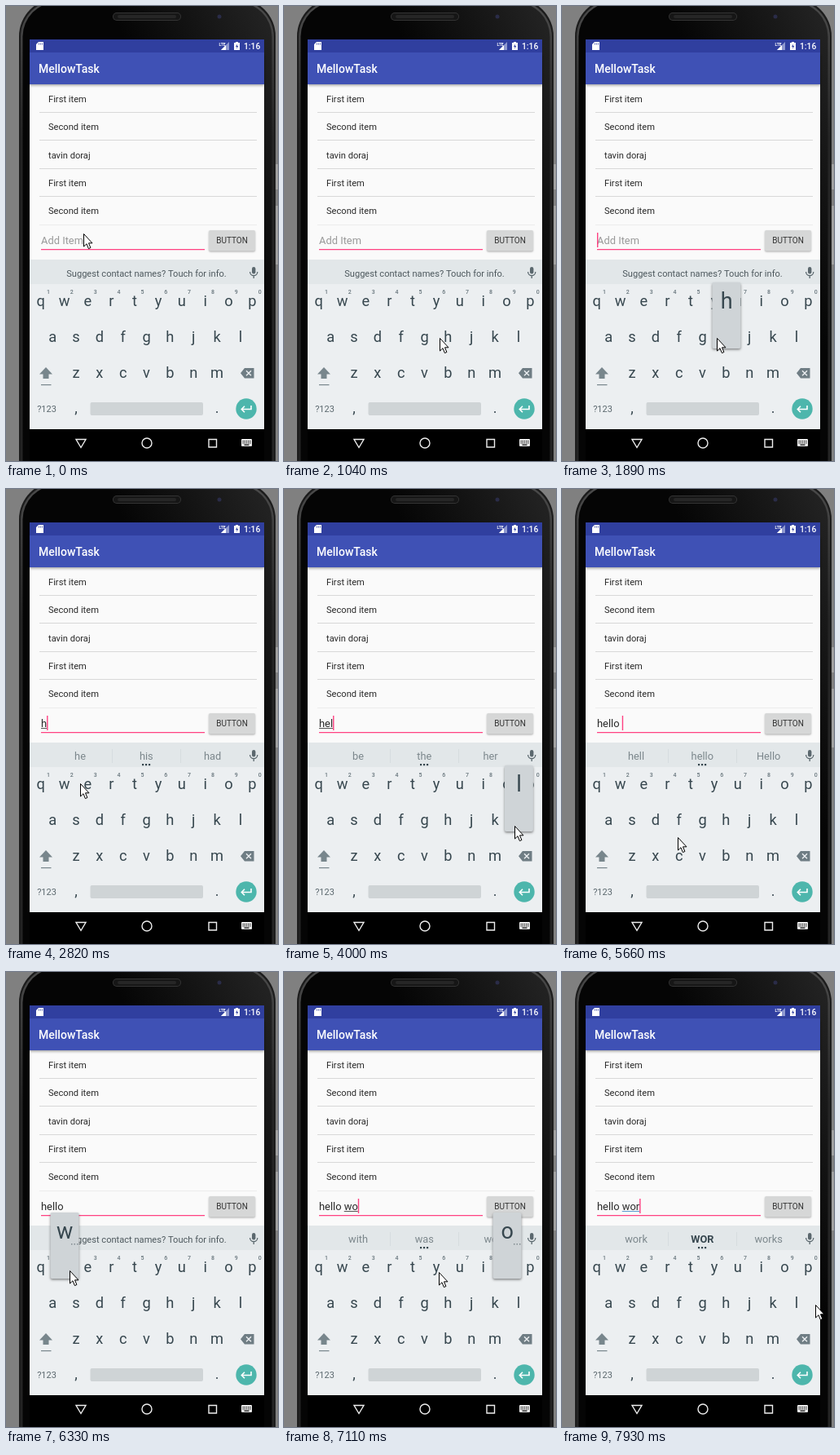
An HTML page with a canvas that plays this animation: 334x558 px, repeating every 8 s.

```html
<!DOCTYPE html>
<html lang="en">
<head>
<meta charset="utf-8">
<title>Todo typing demo</title>
<style>
html, body { margin: 0; width: 100%; height: 100%; overflow: hidden; background: #808080; }
canvas { display: block; }
</style>
</head>
<body>
<canvas id="stage" width="334" height="558"></canvas>
<script>
const LOOP = 8000, TRAVEL = 350, TYPE_DELAY = 40, RELEASE = 240, BLINK = 440;
const INK = '#37474f', PINK = '#ff4081';
const ctx = document.getElementById('stage').getContext('2d');

// Everything that moves follows from these taps: pointer, popups, text, caret, suggestions.
const tap = (at, key, x, y, words = '') => ({ at, key, x, y, words: words.split(' ').filter(Boolean) });
const taps = [
  tap(540, '', 95, 279),
  tap(1890, 'h', 191, 407, 'he his had'),
  tap(3100, 'e', 91, 361, 'be the her'),
  tap(3950, 'l', 283, 413, "help he'll held"),
  tap(4240, 'l', 283, 413, "bell he'll Bell"),
  tap(5060, 'o', 272, 365, 'hell hello Hello'),
  tap(5560, ' ', 205, 487),
  tap(6330, 'w', 77, 366, 'with was we'),
  tap(6990, 'o', 272, 369, 'would WO work'),
  tap(7560, 'r', 129, 367, 'work WOR works'),
  tap(LOOP, '', 311, 408)
];
const lastTap = t => taps.findLast(p => p.at <= t);
const isFix = words => words.length > 1 && words[1] === words[1].toUpperCase();

function stateAt(t) {
  const next = taps.findIndex(p => p.at > t);
  const from = taps[Math.max(next - 1, 0)], to = taps[next];
  const left = 1 - Math.min(Math.max((t - from.at) / TRAVEL, 0), 1);
  const ease = 1 - left * left;
  const entered = lastTap(t - TYPE_DELAY);
  return {
    x: from.x + (to.x - from.x) * ease,
    y: from.y + (to.y - from.y) * ease,
    popup: t < from.at + RELEASE ? from.key.trim() : '',
    value: taps.filter(p => p.at <= t - TYPE_DELAY).map(p => p.key).join(''),
    caret: entered && Math.floor((t - TYPE_DELAY - entered.at) / BLINK) % 2 === 0,
    words: lastTap(t - RELEASE)?.words ?? []
  };
}

const keys = {};
['qwertyuiop', 'asdfghjkl', 'zxcvbnm'].forEach((row, r) =>
  [...row].forEach((c, i) => keys[c] = { x: 42.7 + (i + r * (r + 1) / 4) * 28.85, y: 368 + r * 44 }));

function rect(x, y, w, h, color, r = 0) {
  ctx.fillStyle = color;
  ctx.beginPath();
  ctx.roundRect(x, y, w, h, r);
  ctx.fill();
}
function text(s, x, y, size, color, align = 'left', weight = 400) {
  ctx.font = `${weight} ${size}px Roboto, sans-serif`;
  ctx.textAlign = align;
  ctx.fillStyle = color;
  ctx.fillText(s, x, y);
  return ctx.measureText(s).width;
}
function path(d, fill, stroke, width = 1) {
  const p = new Path2D(d);
  if (fill) { ctx.fillStyle = fill; ctx.fill(p); }
  if (stroke) { ctx.strokeStyle = stroke; ctx.lineWidth = width; ctx.stroke(p); }
}
function disc(x, y, r, fill, stroke, width) {
  path(`M${x - r} ${y}a${r} ${r} 0 1 1 ${2 * r} 0a${r} ${r} 0 1 1 ${-2 * r} 0`, fill, stroke, width);
}
function shadow(color, blur, dy, draw) {
  ctx.save();
  Object.assign(ctx, { shadowColor: color, shadowBlur: blur, shadowOffsetY: dy });
  draw();
  ctx.restore();
}
function fade(x0, y0, x1, y1, ...colors) {
  const g = ctx.createLinearGradient(x0, y0, x1, y1);
  colors.forEach((c, i) => g.addColorStop(i / (colors.length - 1), c));
  return g;
}

function drawPhone() {
  rect(0, 0, 334, 558, '#808080');
  for (const [y, h] of [[194, 31], [245, 72]]) rect(331, y, 3, h, '#a0a0a0');
  rect(16, -9, 315, 640, '#1c1c1c', 46);
  rect(18, -7, 311, 640, fade(0, 0, 0, 160, '#4a4a4a', '#242424'), 45);
  rect(20.5, -4.5, 306, 640, fade(150, 50, 300, -20, '#050505', '#222'), 42);
  rect(131, 8, 84, 10, '#343434', 5);
  rect(132, 9, 82, 8, '#161616', 4);
  rect(137, 11, 72, 4, '#262626', 2);
  disc(262, 13, 2.5, '#2a2c48');

  rect(29, 519, 288, 39, '#000');
  path('M86 531.5H98L92 541.5Z', null, '#eee', 1.4);
  disc(173, 536, 6, null, '#eee', 1.4);
  path('M249 531.5h9.5v9.5h-9.5z', null, '#eee', 1.4);
  rect(289, 531, 13, 9, '#eee', 1);
  for (let i = 0; i < 10; i++) rect(290.5 + i % 5 * 2.2, i < 5 ? 533 : 535.2, 1.2, 1.2, '#000');
  rect(292.5, 537.6, 6, 1.2, '#000');
}

function drawApp() {
  rect(29, 41, 288, 270, '#fafafa');
  shadow('rgba(0,0,0,.35)', 3, 1.5, () => rect(29, 57, 288, 39, '#3f51b5'));
  rect(29, 41, 288, 16, '#303f9f');
  path('M40 44H46V54H37V47Z', '#fff');
  path('M40.5 45.5v2M42.5 45.5v2M44.5 45.5v2', null, '#303f9f', .8);
  text('LTE', 261.5, 48.5, 5, '#fff', 'left', 700);
  path('M274 44V54H264Z', '#8f99cf');
  path('M270 48V54H264Z', '#fff');
  path('M282 45V44H285V45H287V54H280V45Z', '#fff');
  path('M284 46.5L282 50H283.5L283 52.8L285.3 49H283.8Z', '#303f9f');
  text('1:16', 292, 53, 10.3, '#fff', 'left', 500);
  text('MellowTask', 40, 82, 14, '#fff', 'left', 500);
  ['First item', 'Second item', 'tavin doraj', 'First item', 'Second item'].forEach((item, i) => {
    text(item, 52, 118 + i * 34.3, 11.15, '#2a2a2a');
    rect(41, 130 + Math.round(i * 34.4), 267, 1, i < 4 ? '#d8d8d8' : '#ececec');
  });
  rect(43, 298, 201, 1.3, PINK);
  shadow('rgba(0,0,0,.3)', 2, 1, () => rect(249, 275, 57, 25.5, '#d6d7d7', 2));
  text('BUTTON', 277.5, 291, 10, '#333', 'center');
}

function drawField({ value, caret, words }) {
  const width = text(value || 'Add Item', 43, 292, 12.9, value ? '#2a2a2a' : '#9a9a9a');
  const end = 43 + (value ? width : 0);
  const wordWidth = value ? ctx.measureText(value.split(' ').pop()).width : 0;
  rect(end - wordWidth, 293, wordWidth, 1, isFix(words) ? '#5b9bd0' : '#555');
  if (caret) rect(end, 278, 1.4, 18, PINK);
}

function drawSuggestions({ words }) {
  rect(29, 311, 288, 30, '#e2e7e9');
  words.forEach((word, i) => {
    const strong = i === 1 && isFix(words);
    text(word, 91 + i * 81.3, 332, 12.8, strong ? INK : '#7c878c', 'center', strong ? 700 : 400);
    rect(167 + i * 4, 337, 2.2, 2.2, INK);
    if (i) rect(46 + i * 84, 319, 1, 17, '#d6dcdf');
  });
  if (!words.length)
    text('Suggest contact names? Touch for info.', 172.5, 331.5, 11.1, '#4d585d', 'center');
  rect(302, 320, 4.4, 8.5, '#5b686e', 2.2);
  path('M299.6 326a4.6 4.6 0 0 0 9.2 0M304.2 330.5V334', null, '#5b686e', 1.3);
}

function drawKeyboard() {
  rect(29, 311, 288, 208, '#eceff1');
  for (const [c, { x, y }] of Object.entries(keys)) text(c, x, y, 18.3, INK, 'center');
  for (let i = 0; i < 10; i++)
    text((i + 1) % 10, 52 + i * 28.85, 353, 7, '#66747b', 'center', 500);
  path('M49 443L57 451.5H52.5V457H45.5V451.5H41Z', '#78868c');
  rect(43, 464, 12.5, 1.2, '#78868c');
  path('M293 444H304.5V456.5H293L288 450.2Z', '#6f7d84');
  path('M295 447.3l6 6m0-6l-6 6', null, '#eceff1', 1.4);
  text('?123', 50, 497.5, 11, '#5b686e', 'center');
  text(',', 86, 499, 18, INK, 'center');
  text('.', 259, 499, 18, INK, 'center');
  rect(103.5, 486, 138.5, 16, '#cfd4d6', 2);
  disc(295, 494, 12.7, '#4db6ac');
  path('M301 490V494.5H289.5M293 490.8L289.3 494.5L293 498.2', null, '#fff', 1.6);
}

function drawPopup({ popup }) {
  if (!popup) return;
  const { x, y } = keys[popup];
  shadow('rgba(0,0,0,.45)', 3, 1.5, () => rect(x - 17, y - 73, 35, 81, '#cfd4d7', 2));
  text(popup, x + .7, y - 41.5, 27, INK, 'center');
  if (y < 400) for (let i = 0; i < 3; i++) rect(x + 8.5 + i * 3.5, y - 35, 1.4, 1.4, '#7c878c');
}

function drawPointer({ x, y }) {
  ctx.save();
  ctx.translate(Math.round(x), Math.round(y));
  path('M.5 .5V16L4 12.7L6.4 18.6L8.9 17.5L6.5 11.8H11Z', '#fff', '#000');
  ctx.restore();
}

function frame() {
  const state = stateAt(performance.now() % LOOP);
  for (const draw of [drawPhone, drawApp, drawField, drawKeyboard, drawSuggestions, drawPopup, drawPointer])
    draw(state);
  requestAnimationFrame(frame);
}
frame();
</script>
</body>
</html>
```
